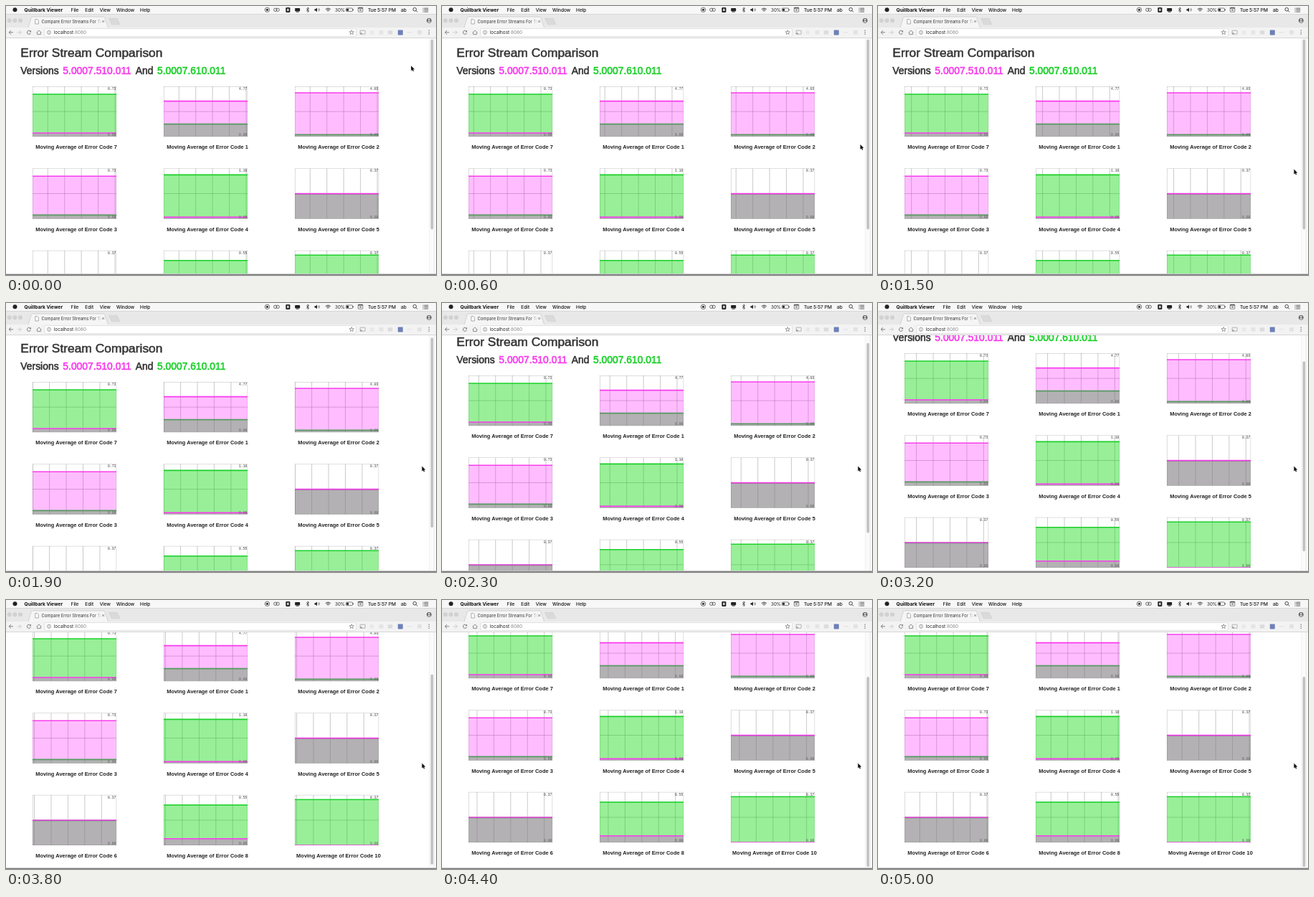
Animation of 600 by 375 pixels, one loop 5.1 s. Source, as an HTML page with a canvas:

```html
<!DOCTYPE html>
<html lang="en">
<head>
<meta charset="utf-8">
<title>Error Stream Comparison</title>
<style>
html, body { margin: 0; width: 100%; height: 100%; overflow: hidden; background: #fff; }
canvas { display: block; width: 600px; height: 375px; }
</style>
</head>
<body>
<canvas id="stage" width="600" height="375"></canvas>
<script>
const ctx = document.getElementById('stage').getContext('2d');
const LOOP = 5100, STEP = 100;
const PINK = '#f83cec', GREEN = '#1bd02a', GRID = '#8e8e8e';
const PINK_FILL = 'rgba(255,0,255,.26)', GREEN_FILL = 'rgba(5,215,5,.41)';
const SANS = '"Liberation Sans", Arial, sans-serif';
const UI = 'Inter, sans-serif';
const MONO = '"Liberation Mono", monospace';
const CHART = { w: 117.2, h: 70.3, x: 37, y: 112, dx: 183, dy: 114.4, line: 23.44 };

// Line heights are measured down from the top of each chart.
const charts = [
  { code: 7, max: '0.73', green: 11, pink: 65 },
  { code: 1, max: '4.77', green: 52.6, pink: 20.6 },
  { code: 2, max: '4.03', green: 67.4, pink: 9 },
  { code: 3, max: '0.73', green: 65, pink: 10.8 },
  { code: 4, max: '1.10', green: 9, pink: 68 },
  { code: 5, max: '0.37', green: 35.6, pink: 35.2 },
  { code: 6, max: '0.37', green: 35.6, pink: 35.2 },
  { code: 8, max: '0.55', green: 14, pink: 61 },
  { code: 10, max: '0.37', green: 6.5, pink: 70.3 }
];

const scrollKeys = [[1700, 0], [2000, 3], [2300, 11], [2700, 24], [3200, 42], [3500, 57], [3800, 69], [4100, 73]];
const pointerX = [[0, 565.2], [200, 569], [400, 578], [600, 583.6], [900, 580.4]];
const pointerY = [[0, 83.3], [200, 108], [400, 158], [600, 193], [900, 227.6]];

function track(keys, t) {
  if (t <= keys[0][0]) return keys[0][1];
  for (let i = 1; i < keys.length; i++) {
    const [t0, a] = keys[i - 1], [t1, b] = keys[i];
    if (t <= t1) return a + (b - a) * (t - t0) / (t1 - t0);
  }
  return keys[keys.length - 1][1];
}

function rect(x, y, w, h, color) {
  ctx.fillStyle = color;
  ctx.fillRect(x, y, w, h);
}

function roundRect(x, y, w, h, r, fill, stroke) {
  ctx.beginPath();
  ctx.roundRect(x, y, w, h, r);
  if (fill) { ctx.fillStyle = fill; ctx.fill(); }
  if (stroke) { ctx.strokeStyle = stroke; ctx.lineWidth = .6; ctx.stroke(); }
}

function circle(x, y, r, fill, stroke, width = .7) {
  ctx.beginPath();
  ctx.arc(x, y, r, 0, Math.PI * 2);
  if (fill) { ctx.fillStyle = fill; ctx.fill(); }
  if (stroke) { ctx.strokeStyle = stroke; ctx.lineWidth = width; ctx.stroke(); }
}

function arc(x, y, r, from, to, color, width) {
  ctx.beginPath();
  ctx.arc(x, y, r, from, to);
  ctx.strokeStyle = color;
  ctx.lineWidth = width;
  ctx.stroke();
}

function path(points, stroke, width = .7, fill, close) {
  ctx.beginPath();
  points.forEach(([x, y], i) => i ? ctx.lineTo(x, y) : ctx.moveTo(x, y));
  if (close) ctx.closePath();
  if (fill) { ctx.fillStyle = fill; ctx.fill(); }
  if (stroke) { ctx.strokeStyle = stroke; ctx.lineWidth = width; ctx.stroke(); }
}

function text(str, x, y, font, color, align = 'left', weight = 0) {
  ctx.font = font;
  ctx.textAlign = align;
  ctx.fillStyle = color;
  ctx.fillText(str, x, y);
  if (weight) {
    ctx.strokeStyle = color;
    ctx.lineWidth = weight;
    ctx.strokeText(str, x, y);
  }
}

function series(x, y, level, color, fill) {
  rect(x, y + level, CHART.w, CHART.h - level, fill);
  path([[x, y + level], [x + CHART.w, y + level]], color, 1.6);
}

function drawChart(chart, x, y, t) {
  const { w, h, line } = CHART;
  ctx.save();
  ctx.beginPath();
  ctx.rect(x, y, w, h);
  ctx.clip();
  rect(x, y, w, h, '#fff');
  const shift = 21.3 - line * t / 1000;
  for (let gx = ((shift % line) + line) % line; gx < w; gx += line) {
    path([[x + gx, y], [x + gx, y + h]], GRID, .47);
  }
  path([[x, y + h / 2], [x + w, y + h / 2]], GRID, .47);
  ctx.strokeStyle = GRID;
  ctx.lineWidth = .6;
  ctx.strokeRect(x, y, w, h);
  series(x, y, chart.green, GREEN, GREEN_FILL);
  series(x, y, chart.pink, PINK, PINK_FILL);
  text(chart.max, x + w - .9, y + 4.9, '4.7px ' + MONO, '#333', 'right');
  text('0.00', x + w - .9, y + h - .9, '4.7px ' + MONO, '#5c5c5c', 'right');
  ctx.restore();
  text('Moving Average of Error Code ' + chart.code, x + 61, y + 87.1,
    'bold 7.46px ' + SANS, '#222', 'center');
}

function drawPage(t, scroll) {
  rect(0, 45, 600, 328, '#fff');
  ctx.save();
  ctx.beginPath();
  ctx.rect(0, 45, 597, 328);
  ctx.clip();
  ctx.translate(0, -scroll);
  text('Error Stream Comparison', 20.3, 70.6, '17.4px ' + SANS, '#333', 'left', .5);
  const heading = (str, x, color) => text(str, x, 95.3, '13.9px ' + SANS, color, 'left', .6);
  heading('Versions', 20.3, '#333');
  heading('5.0007.510.011', 79.3, PINK);
  heading('And', 180.8, '#333');
  heading('5.0007.610.011', 210.9, GREEN);
  charts.forEach((chart, i) => drawChart(chart,
    CHART.x + i % 3 * CHART.dx, CHART.y + Math.floor(i / 3) * CHART.dy, t));
  ctx.restore();

  rect(591, 45, 6, 328, '#fafafa');
  rect(590.6, 45, .5, 328, '#e4e4e4');
  roundRect(592.6, 46.5 + scroll * .83, 3.6, 265, 1.8, '#c1c1c1');
  rect(597, 45, .5, 328, '#d0d0d0');
  rect(0, 373, 600, 1, '#c9c9c9');
  rect(0, 374, 600, 1, '#77787a');
}

function drawMenuBar() {
  rect(0, 0, 600, 11, '#f7f7f7');
  circle(12.5, 5.2, 3, '#222');
  text('Quillbark Viewer', 25.6, 7.7, 'bold 6.6px ' + UI, '#111');
  [['File', 90.5], ['Edit', 110.3], ['View', 130.7], ['Window', 154], ['Help', 187]]
    .forEach(([label, x]) => text(label, x, 7.7, '6.6px ' + UI, '#111', 'left', .1));

  circle(364.5, 5.3, 3.2, null, '#333');
  circle(364.5, 5.3, 1.6, '#333');
  circle(375.8, 5.3, 2.2, null, '#333');
  circle(379.2, 5.3, 2.2, null, '#333');
  roundRect(390.4, 2, 6, 7, 1.2, '#222');
  rect(392.4, 3.6, 2, 3.6, '#f7f7f7');
  roundRect(403.2, 3, 7, 4.4, .8, '#222');
  rect(404.8, 7.8, 3.8, .8, '#222');
  path([[419.2, 3.6], [422.8, 7], [421, 8.6], [421, 2], [422.8, 3.6], [419.2, 7]], '#222', .7);
  path([[430.5, 4.2], [432, 4.2], [434, 2.4], [434, 8.2], [432, 6.4], [430.5, 6.4]], null, 0, '#222', true);
  [1.5, 3].forEach(r => arc(434.4, 5.3, r, -.8, .8, '#333', .6));
  [1.4, 3.2, 5].forEach(r => arc(449.4, 8.2, r, -2.35, -.79, '#222', .9));
  text('30%', 459, 7.7, '6.3px ' + UI, '#222');
  roundRect(474.5, 3, 9, 4.6, .8, null, '#333');
  rect(475.3, 3.8, 2.7, 3, '#222');
  rect(484, 4.4, .8, 1.8, '#333');
  roundRect(491.4, 2.2, 6.4, 6, .5, null, '#333');
  rect(491.4, 2.2, 6.4, 1.4, '#444');
  rect(493.2, 5, 2.8, 1.2, '#555');
  text('Tue 5:57 PM', 505, 7.7, '6.6px ' + UI, '#111', 'left', .1);
  text('ab', 551, 7.7, '6.6px ' + UI, '#111', 'left', .1);
  circle(570.3, 4.7, 2.3, null, '#222', .8);
  path([[572, 6.4], [574, 8.4]], '#222', .9);
  [2.8, 5.2, 7.6].forEach(y => {
    rect(581.5, y, 1, .8, '#222');
    rect(583.3, y, 6, .8, '#222');
  });
}

function drawTabs() {
  rect(0, 11, 600, 19, '#e8e8e8');
  rect(0, 11, 600, .6, '#cecece');
  [4.8, 12.4, 20].forEach(x => circle(x, 20.2, 2.7, '#d2d2d2', '#c4c4c4', .4));
  path([[31, 30], [35.2, 16.4], [36.8, 15], [136.5, 15], [138, 16.4], [142.5, 30]], '#c0c0c0', .6, '#f5f5f5');
  path([[143.5, 17.3], [155, 17.3], [158.8, 25.6], [147.5, 25.6]], '#c8c8c8', .5, '#dadada', true);
  path([[40.8, 18.6], [43.8, 18.6], [45.3, 20.1], [45.3, 25], [40.8, 25]], '#777', .6, '#fff', true);
  const fade = ctx.createLinearGradient(122, 0, 134, 0);
  fade.addColorStop(0, '#333');
  fade.addColorStop(1, 'rgba(51,51,51,0)');
  ctx.save();
  ctx.beginPath();
  ctx.rect(48, 15, 85, 14);
  ctx.clip();
  text('Compare Error Streams For Te', 49.4, 23.9, '5.95px ' + UI, fade);
  ctx.restore();
  path([[134.2, 20], [137.2, 23]], '#666', .7);
  path([[137.2, 20], [134.2, 23]], '#666', .7);
  circle(590.3, 20.3, 3.4, '#666');
  circle(590.3, 19.2, 1.2, '#e8e8e8');
  roundRect(588.3, 21.2, 4, 1.5, .7, '#e8e8e8');
}

function drawToolbar() {
  rect(0, 30, 600, 15, '#f3f3f3');
  rect(0, 44.4, 600, .6, '#c4c4c4');
  const arrow = (x, dir, color) => {
    path([[x - 3 * dir, 36.8], [x + 3 * dir, 36.8]], color, .8);
    path([[x, 34], [x + 2.8 * dir, 36.8], [x, 39.6]], color, .8);
  };
  arrow(7, -1, '#666');
  arrow(18.5, 1, '#c4c4c4');
  arc(32, 36.8, 2.6, .3, 5.4, '#666', .8);
  path([[34.9, 33.8], [34.9, 36.2], [32.5, 36.2]], null, 0, '#666', true);
  path([[42.8, 37], [46, 34], [49.2, 37], [48.3, 37], [48.3, 39.6], [43.7, 39.6], [43.7, 37]], '#666', .7, null, true);
  roundRect(54, 31.6, 434.5, 10.8, 1.3, '#fff', '#d0d0d0');
  circle(60, 36.8, 2.6, null, '#666', .6);
  rect(59.7, 36.4, .7, 2, '#666');
  rect(59.7, 35.2, .7, .7, '#666');
  const urlFont = '6.4px ' + UI;
  text('localhost', 66.8, 38.9, urlFont, '#222');
  const hostEnd = 66.8 + ctx.measureText('localhost').width;
  text(':8080', hostEnd, 38.9, urlFont, '#888');

  const star = [];
  for (let i = 0; i < 10; i++) {
    const a = -Math.PI / 2 + i * Math.PI / 5, r = i % 2 ? 1.4 : 3.3;
    star.push([482.3 + Math.cos(a) * r, 36.9 + Math.sin(a) * r]);
  }
  path(star, '#555', .6, null, true);
  roundRect(494.2, 34.2, 7, 5, .5, null, '#888');
  rect(494.2, 37.4, 2.6, 2, '#999');
  circle(510.4, 36.8, 2.9, '#e8e8e8');
  roundRect(520.6, 34, 6, 5.6, 1, '#e4e4e4');
  roundRect(532.8, 34.2, 6.6, 5.2, 1, '#dcdcdc');
  roundRect(546.8, 33.4, 7, 7, .6, '#6f80b8');
  [560.8, 563.2, 565.6].forEach(x => circle(x, 36.8, .8, '#d8d8d8'));
  roundRect(574, 34, 6, 5.6, 1, '#e2e2e2');
  [34.3, 36.8, 39.3].forEach(y => circle(590.2, y, .7, '#666'));
}

function drawPointer(x, y) {
  const shape = [[0, 0], [0, 7], [1.6, 5.6], [2.7, 8], [3.8, 7.5], [2.8, 5.2], [4.9, 5]]
    .map(([px, py]) => [x + px, y + py]);
  path(shape, '#fff', .8, null, true);
  path(shape, null, 0, '#111', true);
}

function draw(now) {
  const t = Math.floor(now % LOOP / STEP) * STEP;
  ctx.lineJoin = 'round';
  drawPage(t, track(scrollKeys, t));
  drawMenuBar();
  drawTabs();
  drawToolbar();
  drawPointer(track(pointerX, t), track(pointerY, t));
}

const start = performance.now();
function tick() {
  draw(performance.now() - start);
  requestAnimationFrame(tick);
}
tick();
</script>
</body>
</html>
```
